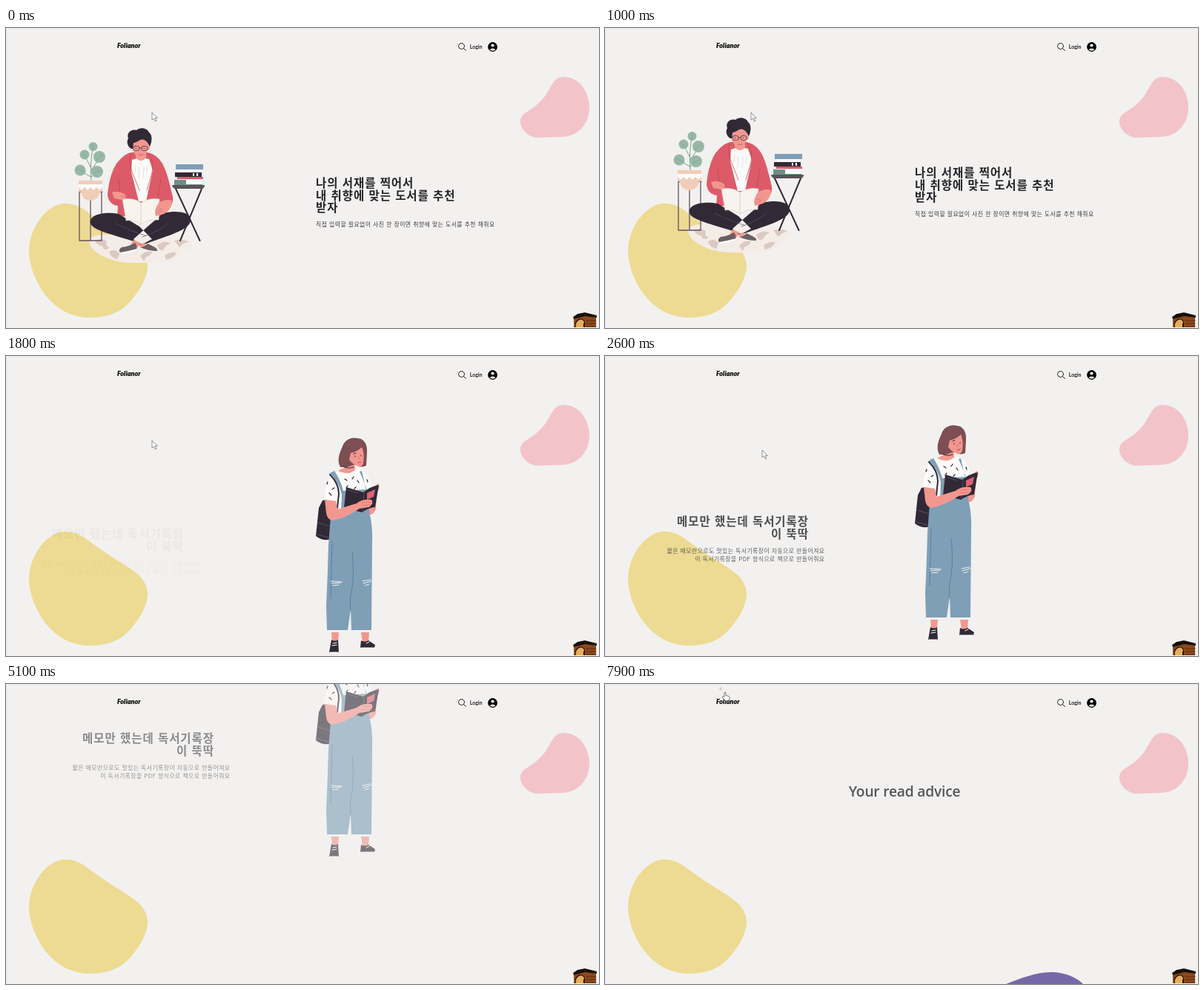
Recreate the animation shown at these times as an HTML page. Size 800 px wide and 405 px high, loop 8000 ms.

```html
<!DOCTYPE html>
<html lang="ko">
<head>
<meta charset="utf-8">
<style>
html, body { margin: 0; width: 100%; height: 100%; overflow: hidden; background: #f2f1ef; }
svg { display: block; width: 800px; height: 405px; }
text { font-family: "Noto Sans CJK KR", "Noto Sans CJK", sans-serif; fill: #24232a; }
.head { font-size: 15.5px; font-weight: 700; letter-spacing: .95px; }
.body { font-size: 7.8px; letter-spacing: .5px; fill: #3b3a40; }
.right { text-anchor: end; }
.mid { text-anchor: middle; }
.title { font: 600 19.2px "Open Sans", sans-serif; letter-spacing: -.2px; }
.logo { font: italic 900 9px Lato, sans-serif; fill: #000; }
.login { font: 700 7px Lato, sans-serif; }
.line { fill: none; stroke-linecap: round; stroke-linejoin: round; }
.skin { fill: #f2978f; }
.dark { fill: #312936; }
.red { fill: #dd5b69; }
.blue { fill: #7f9fb7; }
.white { fill: #fcfbfa; }
.peach { fill: #f1cdb7; }
.ink { stroke: #312936; }
</style>
</head>
<body>
<svg viewBox="0 0 800 405">
  <path d="M0 1H800M.5 0V405" stroke="#ebebef" stroke-width="2"/>
  <path fill="#eddb93" d="M80 237C95 237 103 243 115 252C135 267 155 278 172 290C186 300 191 311 191 322C190 341 178 358 163 374C148 388 130 391 112 391C85 390 66 377 52 359C38 340 31 318 31 300C32 275 45 254 60 244C67 239 73 237 80 237Z"/>
  <path fill="#f2c4ca" d="M752 66C775 66 787 88 787 107C787 130 772 146 750 147C738 147 728 148 716 148C702 146 693 134 694 125C694 117 704 113 712 107C728 95 731 85 738 74C742 68 747 66 752 66Z"/>

  <g id="hero">
    <path fill="#7568a8" d="M541 405C560 398 580 389 602 389C622 389 637 397 645 405Z"/>
    <text id="title" class="title mid" x="404" y="163">Your read advice</text>
    <text id="tagline" class="body mid" x="404" y="184">나만을 위한 사서 폴리아노르</text>
  </g>

  <g id="man">
    <path fill="#f4ece7" d="M113 271C110 283 124 292 140 298C160 306 184 302 207 303C227 302 236 290 249 283C254 271 235 266 215 267L140 265C128 264 116 266 113 271Z"/>
    <path fill="#dacac3" d="M120 274q8-6 16 0q-3 5 4 9q-9 5-10-3q-6 0-10-6ZM139 288q9-5 14 3l-3 7q-9-2-11-10ZM181 294q7-8 16-6q-2 6-8 7l-3 6ZM204 279q11-8 18-2q-7 2-9 8q-6 4-9-6ZM227 273q12-3 19 2q-8 1-12 7ZM214 293q8-5 16-4q-4 8-14 10Z"/>
    <g class="line" stroke="#65515f" stroke-width="1.3">
      <path d="M99 207V273H129V207M99 207H130M114 219V273"/>
      <path stroke="#7aa28e" stroke-width="1" d="M115 193Q113 172 117 147M115 176Q110 164 105 158M115 178L126 162M115 187Q108 184 101 179M115 187L124 180"/>
    </g>
    <g fill="#97b8a6">
      <circle cx="117.500" cy="146" r="6"/><circle cx="106" cy="157" r="6.500"/><circle cx="126" cy="160" r="8"/>
      <circle cx="100" cy="178" r="7.500"/><circle cx="123" cy="180" r="8"/>
    </g>
    <path class="line" stroke="#7aa28e" stroke-width=".7" d="M117 152V143M109 161L102 155M120 165L130 157M107 181L95 176M117 183L128 178"/>
    <path class="peach" d="M98 192H130V207H98ZM101 207H127C126 215 120 219 114 219C107 219 102 215 101 207Z"/>
    <path class="white" d="M98 197H130V201L126 205L122 201L118 205L114 201L110 205L106 201L102 205L98 201Z"/>

    <path class="line ink" stroke-width="2" d="M229 203L261.500 273M264 203L235 273"/>
    <path fill="#5b5258" d="M224 198H268Q268 203 263 203H229Q225 203 224 198Z"/>
    <path class="blue" d="M229 170H266V177H229Z"/>
    <path class="white" d="M232 177H264V181H232ZM243 191H264V197H243Z"/>
    <path class="dark" d="M228 181H264V187H228Z"/>
    <path class="red" d="M231 187H266V190H231Z"/>
    <path fill="#708d88" d="M227 191H243V198H227ZM243 197H265V198H243Z"/>
    <path class="white" d="M252 182h2v4h-2zM257 182h2v4h-2z"/>

    <path class="red" d="M169 154C160 156 155 162 149 169C141 182 138 199 137 211C138 220 143 225 151 226L150 240L214 241L216 231C223 227 226 222 225 214C221 197 217 180 211 169C206 161 200 156 191 154Z"/>
    <path class="white" d="M170 164Q181 159 193 163L198 178L189 220H179L169 180Z"/>
    <path class="skin" d="M175 151H189V161Q182 169 175 161Z"/>
    <path class="line" stroke="#ddd9d9" stroke-width=".8" d="M175 172L174 181M180 174L179 188M186 174L185 188M191 172L190 182"/>
    <path class="line" stroke="#b9424f" stroke-width=".7" d="M168 156Q164 168 172 185L180 205M192 155Q200 165 197 181L190 205M152 190L154 214M209 190L205 214"/>
    <path class="skin" d="M170 133H191C193 146 191 157 184 162C177 164 171 154 170 145ZM191 144q4-1 3 4q-1 4-3 3Z"/>
    <path class="dark" d="M169 149C164 146 162 140 165 135C162 128 169 122 176 124C181 119 191 121 193 127C198 130 197 140 194 146L191 141Q187 135 181 137Q175 141 172 141L171 149Z"/>
    <g class="line ink" stroke-width=".7">
      <rect x="172" y="145.500" width="8" height="6" rx="2.500"/><rect x="183" y="145.500" width="8" height="6" rx="2.500"/>
      <path d="M180 148H183M168 146L172 147M175 148.500h1M186 148.500h1"/><path stroke="#b34e56" d="M179 157Q182 158 185 157"/>
    </g>
    <path class="dark" d="M212 236C235 231 251 236 249 247C246 260 215 267 181 280L172 271L190 255ZM152 237C130 233 111 239 114 250C117 260 150 266 184 278L197 271L180 254Z"/>
    <path class="line" stroke="#595361" stroke-width=".7" d="M148 250Q172 262 188 266M218 250Q204 262 184 268"/>
    <path class="skin" d="M172 272L181 276L178 282L168 279ZM180 278L187 276L190 281L182 283Z"/>
    <path fill="#6a6064" d="M174 276Q178 281 176 285Q164 289 155 290Q150 286 156 282Q166 281 174 276ZM181 282Q187 282 191 277L199 281Q205 284 204 287Q192 287 181 282Z"/>
    <path class="white" d="M154 289Q166 287 177 284L176 287Q164 291 155 291Z"/>
    <path fill="#f8f3ed" stroke="#ddd2cb" stroke-width=".7" d="M157 217Q173 215 182 222Q193 215 207 217L206 245Q191 244 182 251Q173 244 162 246Z"/>
    <path class="line" stroke="#d4c7c0" stroke-width=".7" d="M182 222V251"/>
    <path class="skin" d="M143 208Q153 205 161 211Q164 216 157 218L146 216ZM206 222Q216 216 224 219Q224 231 213 237L202 240Q199 232 206 222Z"/>
    <path class="line" stroke="#ce746f" stroke-width=".7" d="M155 213L161 214M204 232L211 230M204 236L211 233"/>
  </g>
  <g id="manText">
    <text class="head" x="418" y="200.700">나의 서재를 찍어서</text>
    <text class="head" x="418" y="217.500">내 취향에 맞는 도서를 추천</text>
    <text class="head" x="418" y="234">받자</text>
    <text class="body" x="418" y="254">직접 입력할 필요없이 사진 한 장이면 취향에 맞는 도서를 추천 해줘요</text>
  </g>

  <g id="woman">
    <path class="dark" d="M427 178Q436 176 441 184L439 230Q428 234 418 226L422 188Z"/>
    <path class="line" stroke="#555060" stroke-width="1" d="M421 208L437 213M420 224L435 228"/>
    <path class="skin" d="M439 356H449L448 369H440ZM479 356H490L489 369H481ZM490 164L502 155Q506 161 500 167L499 190Q495 199 487 197Z"/>
    <path class="white" d="M448 138Q466 132 480 137Q490 143 492 158L489 184L451 190L446 178L429 176Q431 153 440 142Z"/>
    <path class="skin" d="M455 124H470L471 137Q461 145 448 138L456 134Z"/>
    <path class="blue" d="M437 141L443 138Q451 150 455 165L487 163L477 139L480 138L485 160Q490 178 490 194Q495 212 494 235L493 353H466L465 325L461 353H433L432 320Q434 280 435 238L438 200L452 195L453 170Q449 153 437 141Z"/>
    <path class="line ink" stroke-width="2" d="M437 143Q449 155 449 169L447 188"/>
    <g class="line" stroke="#5f8099" stroke-width="1">
      <path d="M467 247Q470 275 467 296Q463 312 465 327M440 232Q439 270 438 310"/>
      <path stroke="#edf0f3" d="M438 287L453 288M439 290L452 289M441 293L449 292M481 287L492 285M482 290L493 287M484 293L490 291"/>
    </g>
    <path class="line ink" stroke-width="1.300" d="M434 153L433 156M443 161L440 163M436 168L439 171M457 149L460 151M469 146L467 149M461 158L459 161M474 151L476 154M472 160L470 162M487 150L488 153"/>
    <path fill="#7d4e53" d="M451 133C446 123 450 114 454 105C457 96 466 92 474 94C483 94 488 103 487 113L486 131Q477 135 472 129L460 133Z"/>
    <path class="skin" d="M465 114Q474 112 480 106Q484 114 482 128Q480 133 476 132Q468 130 463 123Z"/>
    <path class="line ink" stroke-width="1" d="M471 118V119M479 117V118M469 115L472 114M455 132Q461 136 469 133"/>
    <path class="line" stroke="#b94c55" stroke-width="1" d="M475 127L479 126"/>
    <path class="line" stroke="#d47771" stroke-width=".8" d="M476 118L477 122L475 122"/>
    <path class="dark" d="M459 160L482 167Q492 159 503 157L498 187Q489 188 480 194L456 188Z"/>
    <path class="line" stroke="#595361" stroke-width=".9" d="M483 168L481 192M462 164L475 168"/>
    <path fill="#dc6373" d="M487 168L498 163L496 173L487 177Z"/>
    <path class="skin" d="M430 177L445 179L447 190L473 182Q480 176 493 177Q497 181 490 187L477 189Q456 203 440 205Q433 203 432 195Z"/>
    <path class="line" stroke="#ce746f" stroke-width=".7" d="M480 181L493 180M480 185L491 184"/>
    <path class="dark" d="M439 366Q444 369 448 366L449 383H436ZM479 367Q484 370 489 367L498 373L497 377H478Z"/>
    <path class="line" stroke="#fff" stroke-width="1" d="M441 371L446 370M440 374L446 373M437 383H448M486 371L490 369M479 377H497"/>
  </g>
  <g id="womanText" class="right">
    <text class="head" x="281" y="229">메모만 했는데 독서기록장</text>
    <text class="head" x="281" y="246">이 뚝딱</text>
    <text class="body" x="302.500" y="265.500">짧은 메모만으로도 멋있는 독서기록장이 자동으로 만들어져요</text>
    <text class="body" x="302.500" y="277">이 독서기록장을 PDF 형식으로 책으로 만들어줘요</text>
  </g>

  <text class="logo" x="150" y="27">Folianor</text>
  <g class="line" stroke="#222"><circle cx="614.500" cy="24.500" r="4"/><path d="M617.500 27.500L620.500 30.500"/></g>
  <text class="login" x="625.700" y="28">Login</text>
  <circle cx="656.500" cy="25.500" r="6.400"/>
  <path class="white" d="M652.500 29.300Q656.500 25.500 660.500 29.300Q656.500 32 652.500 29.300Z"/><circle class="white" cx="656.500" cy="23.500" r="2.100"/>

  <path fill="#8b4a1c" d="M766 391L781 386L796 390V404H766Z"/>
  <path class="line" stroke="#5b2d10" d="M783 395H796M783 399H796M783 403H796"/>
  <path fill="#2b160c" d="M768 404V397Q775 388 781 396V404Z"/>
  <path fill="#e7ae58" d="M769 404Q768 398 772 395Q777 391 780 397Q778 400 779 404Z"/>
  <path fill="#17110e" d="M765 390L771 386L781 384L797 388V391L781 389L766 393Z"/>

  <path id="arrow" fill="#fff" stroke="#77757b" stroke-width=".8" d="M0 0V10L2.500 8L4.300 12L6 11.200L4.200 7.500H7.300Z"/>
  <g id="hand">
    <path fill="#fff" stroke="#55535a" stroke-width=".8" d="M3 7V1Q4-.5 5 1V5L9 6Q10.500 6.500 10 9L9 12H4L0 7Q1 5 3 7Z"/>
    <path class="line" stroke="#999" stroke-width=".7" d="M-3-5H-1M-3-4L0-2"/>
  </g>
</svg>
<script>
const LOOP = 8000, STEP = 100;
const el = id => document.getElementById(id);

// Interpolates [time, value] points with smooth easing between them.
function track(t, ...points) {
  if (t <= points[0][0]) return points[0][1];
  for (let i = 1; i < points.length; i++) {
    const [t0, v0] = points[i - 1], [t1, v1] = points[i];
    if (t < t1) {
      const p = (t - t0) / (t1 - t0);
      return v0 + (v1 - v0) * p * p * (3 - 2 * p);
    }
  }
  return points.at(-1)[1];
}

function place(id, x, y, opacity) {
  const node = el(id);
  node.setAttribute("transform", `translate(${x} ${y})`);
  node.setAttribute("opacity", opacity);
}

function draw(t) {
  const manY = track(t, [0, 14], [700, 0], [1000, 0], [1700, -300]);
  const manFade = track(t, [1100, 1], [1700, 0]);
  place("man", 0, manY, manFade);
  place("manText", 0, manY, manFade);

  const womanY = track(t, [1100, 330], [1800, 17], [2300, 0], [4700, 0], [5500, -300]);
  const womanFade = track(t, [1100, 0], [1600, 1], [4800, 1], [5500, 0]);
  place("woman", 0, womanY, womanFade);
  place("womanText", track(t, [1700, -46], [1800, -41], [2600, -6], [3200, 0]), womanY,
    track(t, [1700, 0], [1800, .04], [2600, .8], [3200, 1], [4800, 1], [5400, 0]));

  place("hero", 0, 0, track(t, [5300, 0], [5700, 1]));
  place("title", 0, track(t, [6700, 0], [7300, -39], [7600, -39], [7900, -11.5]),
    track(t, [6700, 1], [7300, 0], [7600, .05], [7900, .75]));
  place("tagline", 0, track(t, [6700, 0], [7200, -25]), track(t, [6700, 1], [7200, 0]));

  place("arrow", track(t, [1900, 197], [2500, 212]), track(t, [1900, 114], [2500, 127]), t < 3000 ? 1 : 0);
  place("hand", track(t, [7500, 154], [7900, 158]), track(t, [7500, -14], [7900, 10.5]), t < 7500 ? 0 : 1);
}

function tick(now) {
  draw(Math.floor(now % LOOP / STEP) * STEP);
  requestAnimationFrame(tick);
}
requestAnimationFrame(tick);
</script>
</body>
</html>
```
